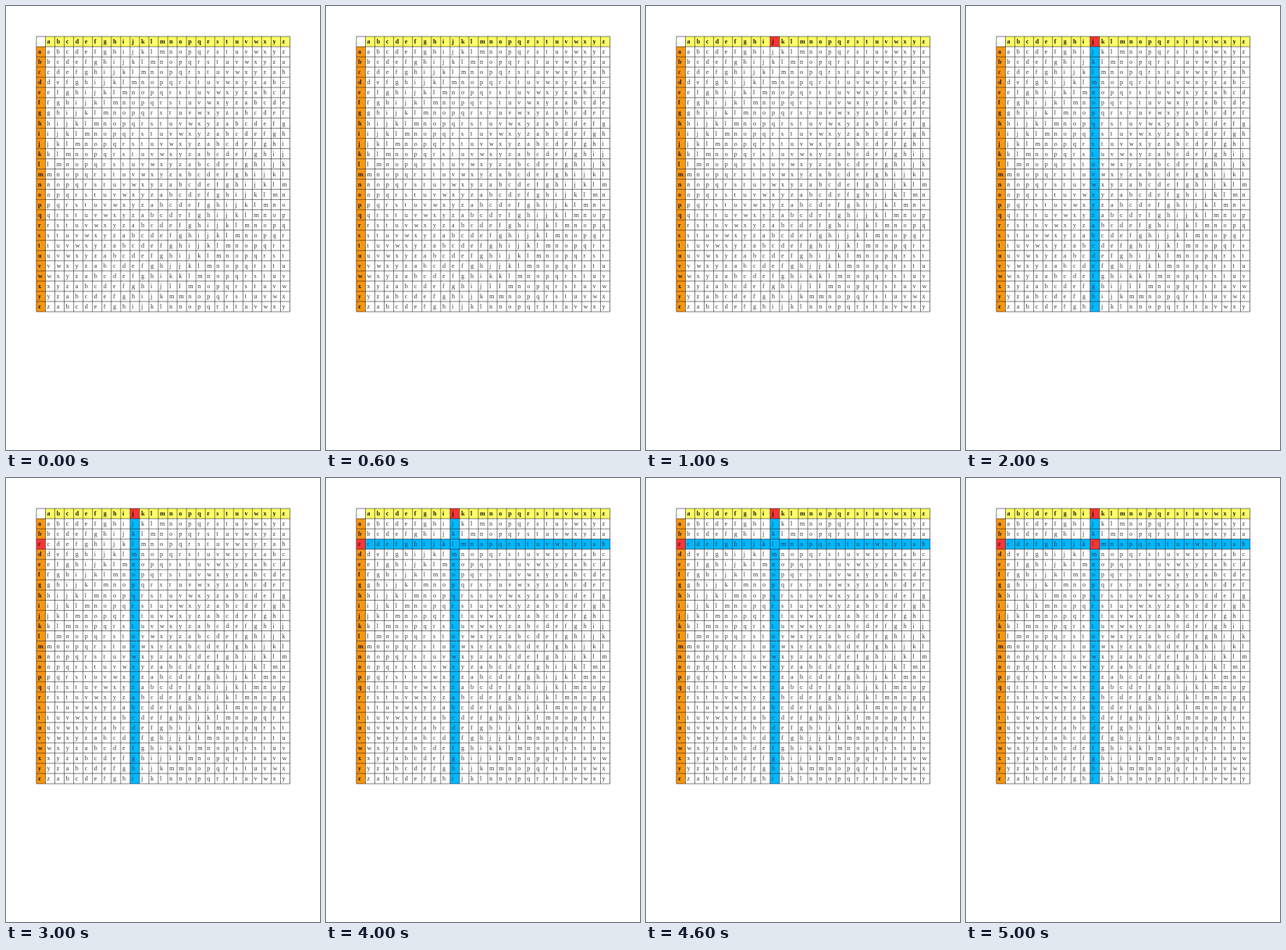
An HTML page for the animation above (6000 ms loop, 402x568 px).

```html
<!DOCTYPE html>
<html lang="en">
<head>
<meta charset="utf-8">
<title>Vigenère square</title>
<style>
  html, body { margin: 0; width: 100%; height: 100%; overflow: hidden; background: #fff; }
  svg { display: block; width: 402px; height: 568px; }
  text { font: 8.1px "Liberation Serif", "Times New Roman", serif; fill: #33363f; }
  .head { font-weight: bold; fill: #1c1c1c; }
  line { stroke: #000; stroke-width: .5; }
</style>
</head>
<body>
<svg id="stage" viewBox="0 0 402 568"></svg>
<script>
const YELLOW = '#ffff66', ORANGE = '#ff950e', RED = '#ff3333', BLUE = '#00b8ff';
const N = 27, STEP = 1000, LOOP = 6000;
const KEY_COL = 10, KEY_ROW = 3;
const stage = document.getElementById('stage');

// Edges of the columns and rows; index 0 is the heading.
const colX = i => i ? 50.5 + (i - 1) * 12.04 : 38.9;
const rowY = i => 39 + i * 13.04;

function add(name, attrs, text) {
  const el = document.createElementNS('http://www.w3.org/2000/svg', name);
  for (const key in attrs) el.setAttribute(key, attrs[key]);
  if (text) el.textContent = text;
  return stage.appendChild(el);
}

function letter(row, col) {
  if (!row && !col) return '';
  let n = Math.max(row - 1, 0) + Math.max(col - 1, 0);
  if (col === 14 && row >= 22) n++; // slip in the printed table
  return String.fromCharCode(97 + n % 26);
}

function cellColor(row, col, step) {
  if (!row && !col) return '#fff';
  if (!row) return col === KEY_COL && step >= 1 ? RED : YELLOW;
  if (!col) return row === KEY_ROW && step >= 3 ? RED : ORANGE;
  const inCol = col === KEY_COL, inRow = row === KEY_ROW;
  if (inCol && inRow && step >= 5) return RED;
  return inCol && step >= 2 || inRow && step >= 4 ? BLUE : '#fff';
}

const cells = [];
for (let row = 0; row < N; row++) {
  for (let col = 0; col < N; col++) {
    const x = colX(col), y = rowY(row);
    const el = add('rect', { x, y, width: colX(col + 1) - x, height: rowY(row + 1) - y });
    cells.push({ el, row, col });
  }
}
for (let i = 0; i <= N; i++) {
  add('line', { x1: colX(i), x2: colX(i), y1: rowY(0), y2: rowY(N) });
  add('line', { x1: colX(0), x2: colX(N), y1: rowY(i), y2: rowY(i) });
}
for (const { row, col } of cells) {
  add('text', { x: colX(col) + 2.1, y: rowY(row) + 9.2, class: row && col ? '' : 'head' }, letter(row, col));
}

let shown = -1;
function draw(time) {
  const step = Math.floor(time % LOOP / STEP);
  if (step === shown) return;
  shown = step;
  for (const { el, row, col } of cells) el.setAttribute('fill', cellColor(row, col, step));
}

const start = performance.now();
function tick() {
  draw(performance.now() - start);
  requestAnimationFrame(tick);
}
tick();
</script>
</body>
</html>
```
